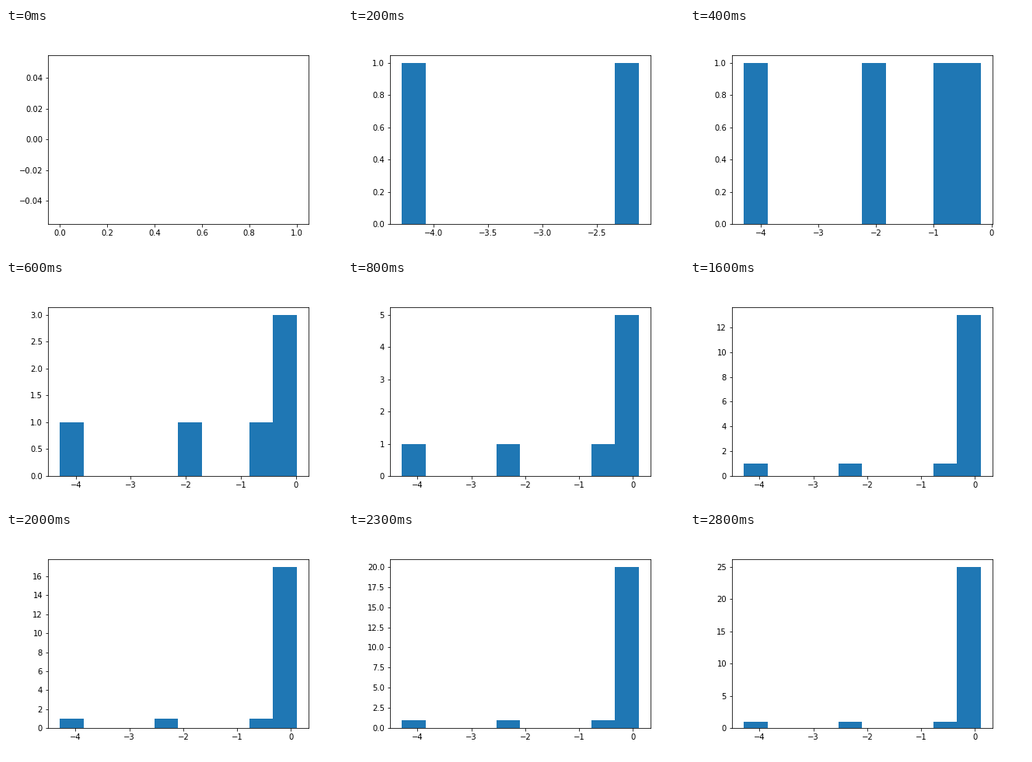
Write a matplotlib script that moves like this. It is 432 px wide and 288 px high and loops after 2900 ms.

```python
import matplotlib.pyplot as plt
import numpy as np
from matplotlib.animation import FuncAnimation

STEPS = 29
INTERVAL = 100

plt.rcParams["font.family"] = "DejaVu Sans"
plt.rcParams["font.size"] = 10

# A series that climbs quickly and then settles just above zero.
RISE = [-4.291, -2.117, -0.72, -0.19, -0.06, 0.015, 0.08, 0.105]
SETTLED = 0.06
series = np.array(RISE + [SETTLED] * (STEPS - 1 - len(RISE)))

fig, ax = plt.subplots(figsize=(6, 4), dpi=72, facecolor="white")
fig.subplots_adjust(left=0.125, right=0.9, bottom=0.125, top=0.88)


def draw(step):
    """Histogram of the first `step` values, with axes rescaled to fit."""
    ax.clear()
    if step == 0:
        ax.set_xlim(-0.05, 1.05)
        ax.set_ylim(-0.055, 0.055)
    else:
        ax.hist(series[:step], bins=10, color="#1f77b4")
    return ax.patches


anim = FuncAnimation(fig, draw, frames=STEPS, init_func=lambda: draw(0),
                     interval=INTERVAL, repeat=True, repeat_delay=0, blit=False)
plt.show()
```
